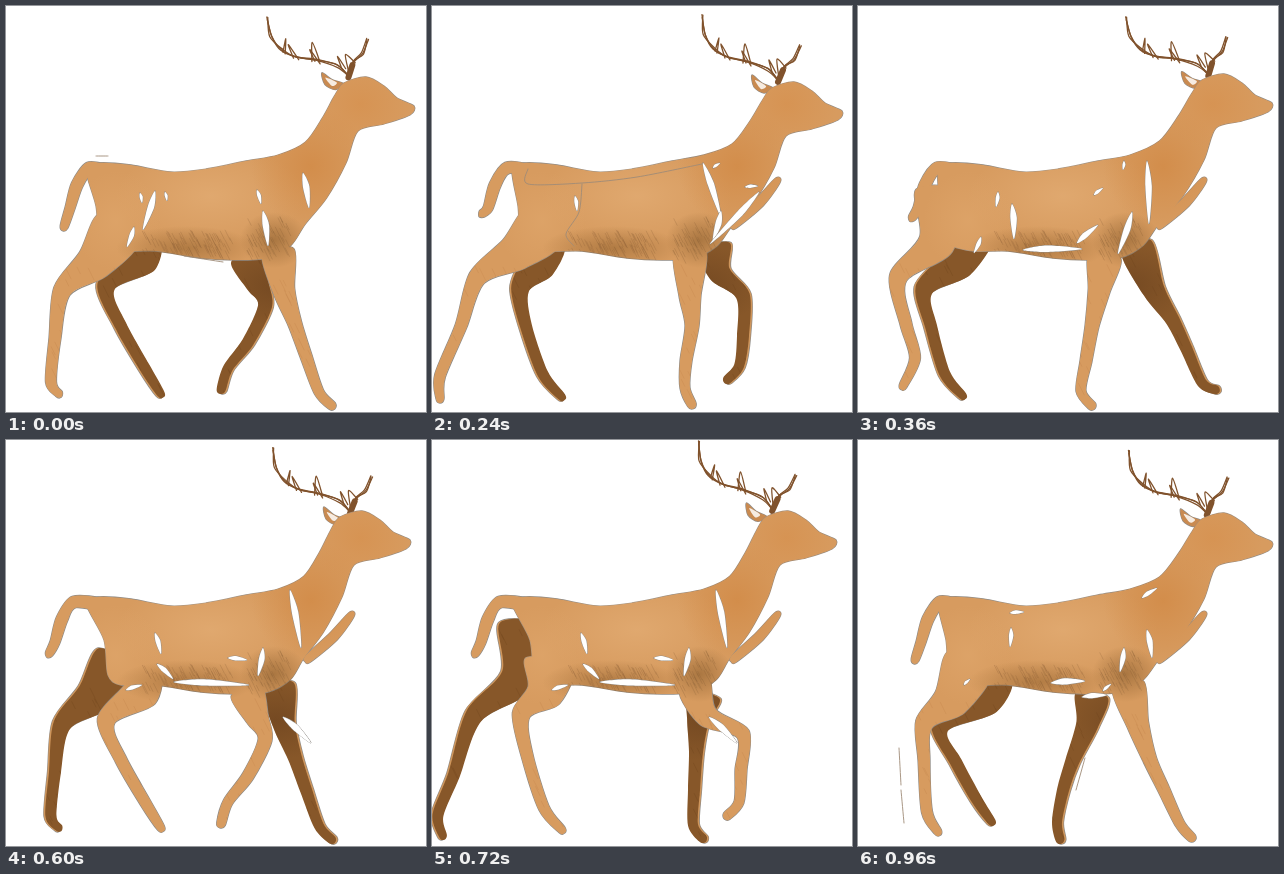
An HTML page with a canvas that plays this animation: 420 px wide and 406 px high, repeating every 1.08 s.

```html
<!DOCTYPE html>
<html lang="en">
<head>
<meta charset="utf-8">
<title>Walking deer</title>
<style>
html, body { margin: 0; width: 100%; height: 100%; overflow: hidden; background: #fff; }
canvas { display: block; }
</style>
</head>
<body>
<canvas id="stage" width="420" height="406"></canvas>
<script>
const W = 420, H = 406, STEP = 120;
const EDGE = '#8f8b86', TAN = '#d79b5f', DARK = '#875729', HORN = '#80522c';
const HIND = [24, 18, 9, 6, 5.5, 4], FRONT = [16, 11, 7, 6, 5, 4.5];
const TORSO = '80 164 92 157 125 159 165 166 200 163 240 155 272 149 300 138 318 115 330 95 340 82 362 76 380 85 393 97 410 105 406 114 380 123 354 130 342 162 322 196 300 220 285 240 262 252 230 254 195 252 150 245 115 245 92 235 88 200';

// Legs run from hip to toe, hind leg first; slits are pairs of end points.
const contact = {
  head: '-2 -5', horns: '311 22 -5', tail: '58 221', rump: 2,
  near: '113 222 87 258 56 285 49 332 45 376 53 388/272 245 278 285 289 318 300 350 313 386 326 400',
  far: '130 235 134 254 100 281 115 320 139 362 155 388/240 250 252 280 259 300 242 336 222 362 215 384',
  slits: '134 187 136 197/149 185 137 224/159 186 161 195/128 221 121 241/251 184 255 198/257 205 262 240/297 167 303 202',
  lines: '90 150 102 150/178 250 217 256'
};
const passing = {
  head: '0 0', horns: '319 24 0', tail: '50 208', rump: -2, strap: true,
  near: '112 220 82 248 45 272 29 320 8 370 8 393/258 245 258 290 260 320 254 355 253 382 260 399',
  far: '108 235 104 262 88 284 94 320 111 368 130 391/282 240 288 268 311 290 311 330 307 360 295 374',
  slits: '271 157 289 211/289 205 281 235/313 181 326 180/327 186 278 238/281 162 288 157/143 190 145 205',
  lines: '96 163 96 178 150 177 205 171 270 158/150 178 147 206 134 228 142 240'
};
const push = {
  head: '4 -8', horns: '318 21 -6', tail: '54 212', rump: -6, strap: true,
  near: '108 225 92 255 68 266 97 312 120 350 130 382/252 238 228 285 216 320 203 358 198 388 203 402',
  far: '85 195 80 240 52 275 47 305 49 365 62 392/278 240 273 262 289 308 303 345 319 385 334 398',
  slits: '140 186 138 201/154 198 156 233/123 231 116 247/165 244 224 243/219 237 240 219/236 189 245 182/266 155 265 164/289 155 291 218/274 206 260 248',
  lines: '217 283 207 310/227 318 218 348'
};
const lift = {
  head: '-6 -5', horns: '315 18 2', tail: '43 214', rump: 10, strap: true,
  near: '118 222 112 255 89 275 95 315 112 368 130 390/262 245 276 277 311 294 309 330 307 362 295 376',
  far: '92 185 86 240 42 276 22 335 6 375 11 396/272 255 266 280 264 312 262 350 261 385 271 399',
  slits: '284 150 295 208/257 208 252 236/222 218 241 220/149 193 155 214/151 224 167 239/168 242 243 245/277 277 305 303/120 250 136 245'
};
const reach = {
  head: '3 2', horns: '319 27 -2', tail: '51 223', rump: -2,
  near: '112 222 98 258 66 284 73 320 87 368 105 390/278 240 296 285 315 315 328 342 344 377 358 384',
  far: '82 185 78 238 40 272 48 318 57 352 45 380/247 250 241 285 234 320 228 355 223 385 234 400',
  slits: '154 185 149 231/152 236 137 244/155 243 232 247/100 263 120 258/257 205 262 252/288 178 298 206/157 178 168 172'
};
const plant = {
  head: '4 -3', horns: '320 24 -2', tail: '57 220', rump: 0, strap: true,
  near: '112 222 92 262 66 284 66 320 69 372 80 392/270 245 280 285 292 320 306 350 322 384 334 398',
  far: '130 235 125 260 82 287 98 322 119 360 134 382/234 255 229 285 214 322 205 350 199 382 202 400',
  slits: '152 173 166 172/153 188 152 207/106 245 112 239/193 243 227 241/245 251 253 244/266 208 262 232/284 158 299 148/289 190 294 218/224 257 249 255',
  lines: '41 308 43 345/43 350 46 383/227 318 218 350'
};

// The other half of the walk swaps the near and far legs.
const swap = (torso, legs) => ({ ...torso, near: legs.far, far: legs.near, lines: '' });

function between(a, b) {
  const mix = { ...a, lines: '' };
  for (const k of ['head', 'horns', 'tail', 'near', 'far']) {
    const other = b[k].match(/-?\d+/g);
    let i = 0;
    mix[k] = a[k].replace(/-?\d+/g, v => Math.round((+v + +other[i++]) / 2));
  }
  return mix;
}

const poses = [
  contact, between(contact, passing), passing,
  swap(push, reach), push,
  { ...swap(lift, contact), horns: '316 22 -1' },
  lift, reach, plant
];

const nums = s => s.split(' ').map(Number);
const parts = s => s ? s.split('/') : [];
const points = s => {
  const n = nums(s);
  return n.filter((_, i) => i % 2 === 0).map((x, i) => [x, n[2 * i + 1]]);
};

function smooth(p, closed = true) {
  const n = p.length, path = new Path2D();
  const at = i => closed ? p[(i + n) % n] : p[Math.max(0, Math.min(n - 1, i))];
  path.moveTo(...p[0]);
  for (let i = 0; i < (closed ? n : n - 1); i++) {
    const [a, b, c, d] = [at(i - 1), at(i), at(i + 1), at(i + 2)];
    path.bezierCurveTo(b[0] + (c[0] - a[0]) / 7, b[1] + (c[1] - a[1]) / 7,
      c[0] - (d[0] - b[0]) / 7, c[1] - (d[1] - b[1]) / 7, ...c);
  }
  if (closed) path.closePath();
  return path;
}

// Outline of a tapering limb along a centre line of half-widths.
function limb(p, widths) {
  const left = [], right = [];
  p.forEach(([x, y], i) => {
    const a = p[Math.max(0, i - 1)], b = p[Math.min(p.length - 1, i + 1)];
    const dx = b[0] - a[0], dy = b[1] - a[1], k = widths[i] / Math.hypot(dx, dy);
    left.push([x - dy * k, y + dx * k]);
    right.unshift([x + dy * k, y - dx * k]);
  });
  const [[ax, ay], [bx, by]] = p.slice(-2), e = 4 / Math.hypot(bx - ax, by - ay);
  return smooth([...left, [bx + (bx - ax) * e, by + (by - ay) * e], ...right]);
}
const legs = s => parts(s).map((t, i) => limb(points(t), i ? FRONT : HIND));

function torso({ head, rump }) {
  const [hx, hy] = nums(head);
  return smooth(points(TORSO).map(([x, y]) => {
    const k = Math.max(0, Math.min(1, (x - 280) / 55));
    return [x + hx * k + (x < 100 && y > 180 ? rump : 0), y + hy * k];
  }));
}

function tail(tip) {
  const [x, y] = nums(tip);
  return limb([[98, 165], [x + 25, 162], [x + 13, 179], [x + 6, 202], [x, y]], [6, 6, 6, 5, 4]);
}

function slit(s) {
  const [[ax, ay], [bx, by]] = points(s), l = Math.hypot(bx - ax, by - ay);
  const w = Math.min(4, 1 + l * .09), nx = (by - ay) / l * w, ny = (ax - bx) / l * w;
  const mx = ax * .6 + bx * .4, my = ay * .6 + by * .4;
  return smooth([[ax, ay], [mx + nx, my + ny], [bx, by], [mx - nx * .6, my - ny * .6]]);
}

function sheet() {
  const c = document.createElement('canvas');
  c.width = W;
  c.height = H;
  const g = c.getContext('2d');
  g.lineJoin = g.lineCap = 'round';
  return g;
}

function random(seed) {
  return () => (seed = seed * 16807 % 2147483647) / 2147483647;
}

function stroke(g, path, color, width) {
  g.strokeStyle = color;
  g.lineWidth = width;
  g.stroke(path);
}

function paint(g, paths, color) {
  paths.forEach(p => stroke(g, p, EDGE, 1.3));
  g.fillStyle = color;
  paths.forEach(p => g.fill(p));
}

function hatch(g, n, x, y, w, h, color) {
  const r = random(n * 97), path = new Path2D();
  for (let i = 0; i < n; i++) {
    const a = x + r() * w, b = y + r() * h, l = 4 + r() * 8;
    path.moveTo(a, b);
    path.lineTo(a + l * .5, b + l);
  }
  stroke(g, path, color, 1);
}

function blob(g, x, y, rx, ry, color) {
  g.save();
  g.translate(x, y);
  g.scale(rx, ry);
  const grad = g.createRadialGradient(0, 0, 0, 0, 0, 1);
  grad.addColorStop(0, color + 'a0');
  grad.addColorStop(1, color + '00');
  g.fillStyle = grad;
  g.fillRect(-1, -1, 2, 2);
  g.restore();
}

function coat(g) {
  g.globalCompositeOperation = 'source-atop';
  blob(g, 205, 190, 95, 50, '#e5b078');
  blob(g, 110, 215, 45, 50, '#e0a76c');
  blob(g, 305, 160, 60, 60, '#d0853f');
  blob(g, 355, 98, 50, 45, '#d68f4c');
  blob(g, 180, 242, 70, 22, '#9b6934');
  blob(g, 268, 234, 34, 28, '#8f6130');
  hatch(g, 90, 135, 224, 90, 22, '#80522a38');
  hatch(g, 50, 240, 210, 40, 36, '#7a502838');
  hatch(g, 170, 0, 255, 370, 130, '#b9763a38');
  g.globalCompositeOperation = 'source-over';
}

function antlers(g, horns) {
  const [x, y, deg] = nums(horns), r = random(5);
  const line = s => smooth(points(s), false);
  g.save();
  g.translate(x, y);
  g.rotate(deg * Math.PI / 180);
  g.translate(-319, -24);
  paint(g, [smooth(points('341 82 330 77 320 69 322 81 332 87'))], '#c98a50');
  g.fillStyle = '#f6ece2';
  g.fill(smooth(points('334 80 323 74 329 83')));
  // Each beam is sketched with a few loose passes.
  parts('347 74 336 64 316 57 296 51 282 42 272 28 271 10/348 74 353 61 362 53 368 40').forEach(s => {
    for (let i = 0; i < 3; i++) {
      const p = points(s).map(([a, b], j) => [a + (r() - .5) * 3, b + (r() - .5) * (j ? 4 : 1)]);
      stroke(g, smooth(p, false), HORN, 1.3);
    }
  });
  parts('283 45 287 32 285 47/293 52 289 38 298 54/311 57 313 38 319 58/319 60 310 45 314 57/340 66 337 54 344 67/347 72 345 53 354 62')
    .forEach(s => stroke(g, line(s), HORN, 1.3));
  stroke(g, line('346 76 351 64'), HORN, 6);
  g.restore();
}

function draw(pose) {
  const g = sheet(), fur = sheet();
  g.fillStyle = '#fff';
  g.fillRect(0, 0, W, H);

  legs(pose.far).forEach((leg, i) => {
    g.save();
    g.translate(i ? 1.5 : -1.5, 0);
    paint(g, [leg], '#cf965c');
    g.restore();
    g.fillStyle = DARK;
    g.fill(leg);
    g.save();
    g.clip(leg);
    hatch(g, 240, 0, 160, 350, 240, '#6a401c48');
    blob(g, 270, 280, 60, 40, '#6b421e');
    g.restore();
  });

  antlers(g, pose.horns);
  const near = [tail(pose.tail), ...legs(pose.near), torso(pose)];
  if (pose.strap) near.push(limb([[346, 174], [328, 196], [302, 219]], [3, 5, 4]));
  paint(fur, near, TAN);
  coat(fur);
  g.drawImage(fur.canvas, 0, 0);

  parts(pose.slits).map(slit).forEach(p => {
    stroke(g, p, EDGE, 1);
    g.fillStyle = '#fff';
    g.fill(p);
  });
  parts(pose.lines).forEach(s => stroke(g, smooth(points(s), false), '#a08c78', .9));
  return g.canvas;
}

const cels = poses.map(draw);
const stage = document.getElementById('stage').getContext('2d');
const start = performance.now();
function tick() {
  const t = Math.max(0, performance.now() - start);
  stage.drawImage(cels[Math.floor(t / STEP) % cels.length], 0, 0);
  requestAnimationFrame(tick);
}
tick();
</script>
</body>
</html>
```
